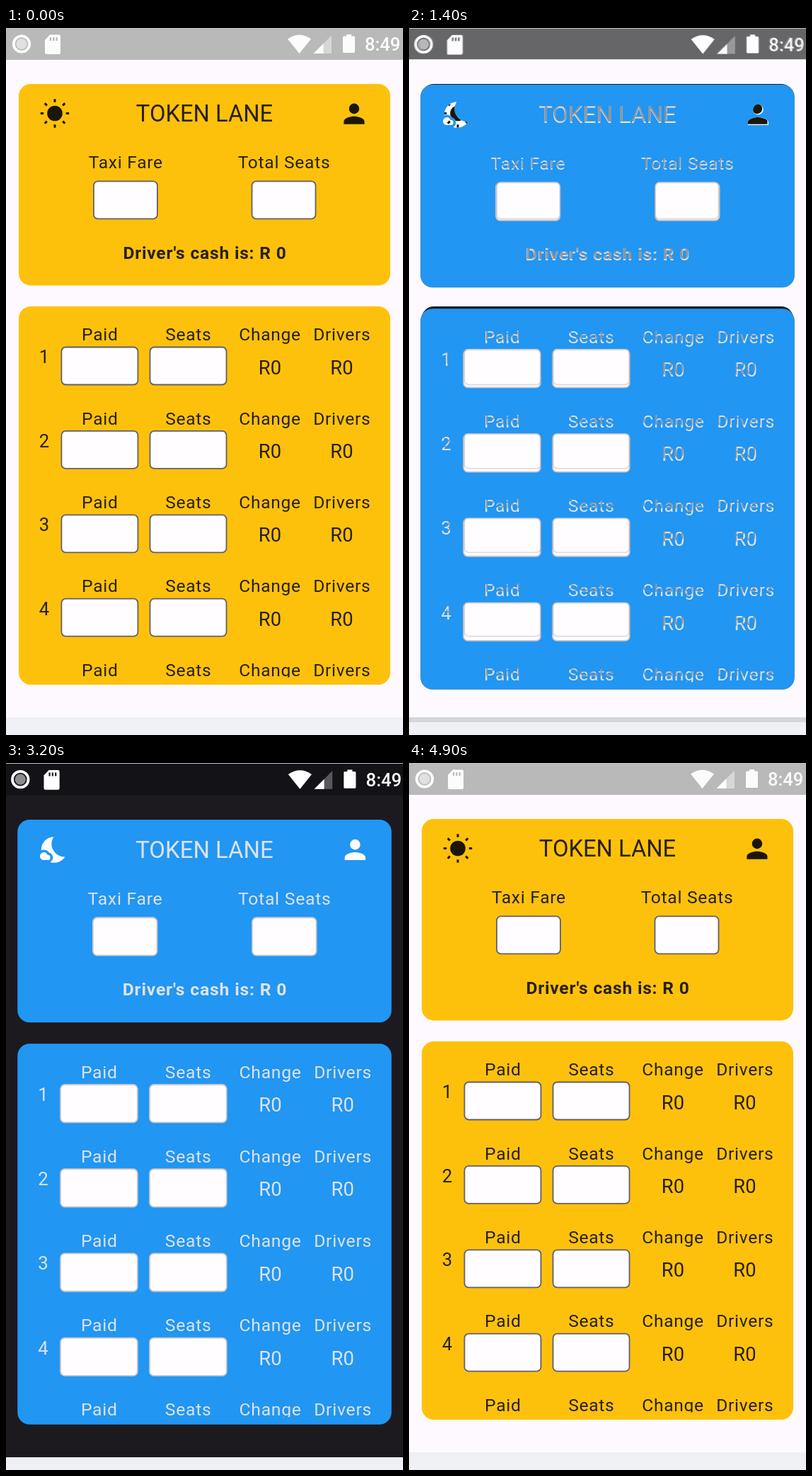
These frames come from a looping animation (561 px wide and 998 px high, 5000 ms). An HTML page:

```html
<!DOCTYPE html>
<html lang="en">
<head>
<meta charset="utf-8">
<title>Taxi fare calculator</title>
<style>
  html, body { margin: 0; width: 100%; height: 100%; overflow: hidden; background: #fdf9ff; }
  svg { display: block; width: 561px; height: 998px; }
  text { font-family: Roboto, "Liberation Sans", sans-serif; }
  mask { mask-type: alpha; }
</style>
</head>
<body>
<svg id="stage" viewBox="0 0 561 998"></svg>
<script>
const LOOP = 5000;
const THEMES = {
  light: {
    card: '#fec10b', bg: '#fdf9ff', bar: '#bab9ba', text: '#282017', icon: '#1c1608',
    line: '#625f6c', status: '#fdfcfd', dot: '#e2e1e2', faint: 0.45, transform: ''
  },
  dark: {
    card: '#2196f3', bg: '#1c1a1f', bar: '#131217', text: '#dfe2e8', icon: '#fffdff',
    line: '#cdc6c8', status: '#fffdff', dot: '#8c8b8e', faint: 0.3,
    transform: 'translate(-1.88 .5) scale(1.0067)'
  }
};

// start time, active theme, strength of the fading theme for each of PARTS
const PARTS = ['surface', 'foot', 'field', 'bar', 'text'];
const STEPS = [
  [0, 'light', 0, 0, 0, 0, 0],
  [1400, 'dark', 1, 0.88, 0.2, 0.5, 0.4],
  [1500, 'dark', 0.45, 0.4, 0, 0.12, 0.15],
  [1600, 'dark', 0.08, 0.08, 0, 0, 0],
  [1700, 'dark', 0, 0, 0, 0, 0],
  [3500, 'light', 0.5, 0.5, 0, 0.13, 0.28],
  [3600, 'light', 0.08, 0.08, 0, 0, 0],
  [3700, 'light', 0, 0, 0, 0, 0]
];

const PITCH = 118.4;
const rows = [0, 1, 2, 3, 4];

const label = (s, x, y, size = 24.55, gap = 0.74, weight = 400) =>
  `<text x="${x}" y="${y}" font-size="${size}" letter-spacing="${gap}" font-weight="${weight}" text-anchor="middle">${s}</text>`;

const field = (x, y, w, h = 53) =>
  `<rect x="${x}" y="${y}" width="${w}" height="${h}" rx="6"/>`;

const hole = (y, h, x = 18, w = 525, r = 17) =>
  `M${x + r} ${y}h${w - 2 * r}a${r} ${r} 0 0 1 ${r} ${r}v${h - 2 * r}a${r} ${r} 0 0 1 ${-r} ${r}` +
  `h${2 * r - w}a${r} ${r} 0 0 1 ${-r} ${-r}v${2 * r - h}a${r} ${r} 0 0 1 ${r} ${-r}z`;

const sun = () => {
  let rays = '';
  for (let i = 0; i < 8; i++) {
    rays += `<path d="M0 -15.8V-20.2" transform="rotate(${i * 45})"/>`;
  }
  return `<g transform="translate(69 120.5)"><circle r="10.8"/><g stroke="${THEMES.light.icon}" stroke-width="3">${rays}</g></g>`;
};

const moon = () => `<path transform="translate(47.7 99.3) scale(1.82)" d="M11.1 12.08C8.77 7.57 10.6 3.6 11.63 2.01
  6.27 2.2 1.98 6.59 1.98 12c0 .14.02.28.02.42C2.62 12.15 3.29 12 4 12c1.66 0 3.18.83 4.1 2.15C9.77 14.63 11 16.17 11 18
  c0 1.52-.87 2.83-2.12 3.51.98.32 2.03.5 3.11.5 3.5 0 6.58-1.8 8.37-4.52C17.99 17.72 13.38 16.52 11.1 12.08z
  M7 16h-.18C6.4 14.84 5.3 14 4 14a3 3 0 0 0 0 6h3a2 2 0 0 0 0-4z"/>`;

const person = `<path transform="translate(470.1 99.3) scale(1.82)"
  d="M12 12a4 4 0 1 0 0-8 4 4 0 0 0 0 8zm0 2c-2.67 0-8 1.34-8 4v2h16v-2c0-2.66-5.33-4-8-4z"/>`;

function surfaces(name, t) {
  const frame = `M-9 44H570V973H-9z${hole(79, 284.4)}${hole(393, 534)}`;
  return `<path d="${frame}" fill="${t.bg}" fill-rule="evenodd"/>
    <g fill="${t.icon}">${name === 'light' ? sun() : moon()}${person}</g>`;
}

function fields(t) {
  const inputs = rows.slice(0, 4).map(i => {
    const y = 450.5 + i * PITCH;
    return field(78.4, y, 108) + field(203.5, y, 108);
  });
  return `<g fill="#fffdff" stroke="${t.line}" stroke-width="1.8">
    ${field(123.9, 216.3, 90)}${field(347.5, 216.3, 90)}${inputs.join('')}</g>`;
}

function statusBar(t) {
  return `<rect x="-9" y="-3" width="579" height="48" fill="${t.bar}"/>
    <g fill="${t.status}">
      <circle cx="22" cy="22.5" r="11.2" fill="none" stroke="${t.status}" stroke-width="3.8"/>
      <circle cx="22" cy="22.5" r="7.6" fill="${t.dot}"/>
      <path d="M62 9.5H75a2 2 0 0 1 2 2V35a2 2 0 0 1-2 2H57a2 2 0 0 1-2-2V17z"/>
      <path d="M63 13v5M67.3 13v5M71.6 13v5" stroke="${t.bar}" stroke-width="2.2"/>
      <path d="M398 15.5Q414.5 4 431 15.5L414.5 36z"/>
      <path d="M434.5 36L460 10.5V36z" opacity="${t.faint}"/>
      <path d="M434.5 36L448.5 22V36z"/>
      <path d="M481 9h7v2.5h3.5a1.5 1.5 0 0 1 1.5 1.5V33.5a1.5 1.5 0 0 1-1.5 1.5h-14a1.5 1.5 0 0 1-1.5-1.5V13a1.5 1.5 0 0 1 1.5-1.5H481z"/>
      ${label('8:49', 532.2, 32, 25.6, 0, 500)}
    </g>`;
}

function labels(t) {
  const row = i => {
    const y = i * PITCH;
    return label('Paid', 132.8, 441.1 + y) + label('Seats', 257.8, 441.1 + y) +
      label('Change', 373, 441.1 + y) + label('Drivers', 474.8, 441.1 + y) +
      label('R0', 373, 488.5 + y, 27.3, 0.2) + label('R0', 474.5, 488.5 + y, 27.3, 0.2) +
      label(i + 1, 54, 473.3 + y, 25.6, 0);
  };
  return `<g fill="${t.text}">
    ${label('TOKEN LANE', 280.5, 132.3, 32.73, 0)}
    ${label('Taxi Fare', 169.3, 198)}${label('Total Seats', 393, 198)}
    ${label("Driver's cash is: R 0", 281, 325.8, 24.55, 0.8, 700)}
    <g clip-path="url(#list)">${rows.map(row).join('')}</g></g>`;
}

const use = (name, part) => `<use href="#${name}-${part}"/>`;
const useAll = name => PARTS.map(p => use(name, p)).join('');

function define(name) {
  const t = THEMES[name];
  const body = {
    surface: surfaces(name, t),
    foot: '<rect x="-9" y="973" width="579" height="40" fill="#eff0f5"/>',
    field: fields(t),
    bar: statusBar(t),
    text: labels(t)
  };
  return PARTS.map(p => `<g id="${name}-${p}" transform="${t.transform}">${body[p]}</g>`).join('') +
    `<mask id="${name}-mask" maskUnits="userSpaceOnUse" x="0" y="0" width="561" height="998">${useAll(name)}</mask>`;
}

// The fading theme shows only where both themes have something other than card colour.
function scene(name, old) {
  return `<g id="${name}">
    <rect width="561" height="998" fill="${THEMES[name].card}"/>
    ${useAll(name)}
    <g mask="url(#${name}-mask)" class="fade">
      ${PARTS.map(p => `<g class="${p}">${use(old, p)}</g>`).join('')}
    </g></g>`;
}

const stage = document.getElementById('stage');
stage.innerHTML = `<defs>
    <clipPath id="list"><rect x="18" y="393" width="525" height="523.5"/></clipPath>
    ${define('light')}${define('dark')}
  </defs>
  ${scene('light', 'dark')}${scene('dark', 'light')}
  <rect width="561" height="1" fill="#c4c3c4"/>`;

let shown = null;
function draw(now) {
  const time = now % LOOP;
  const step = STEPS.filter(s => s[0] <= time).pop();
  if (step === shown) return;
  shown = step;
  const [, name, ...fade] = step;
  for (const key in THEMES) {
    document.getElementById(key).style.display = key === name ? '' : 'none';
  }
  const layer = document.querySelector(`#${name} .fade`);
  layer.style.display = fade.some(v => v > 0) ? '' : 'none';
  PARTS.forEach((p, i) => { layer.querySelector('.' + p).style.opacity = fade[i]; });
}

const start = performance.now();
function tick() {
  draw(performance.now() - start);
  requestAnimationFrame(tick);
}
tick();
</script>
</body>
</html>
```
